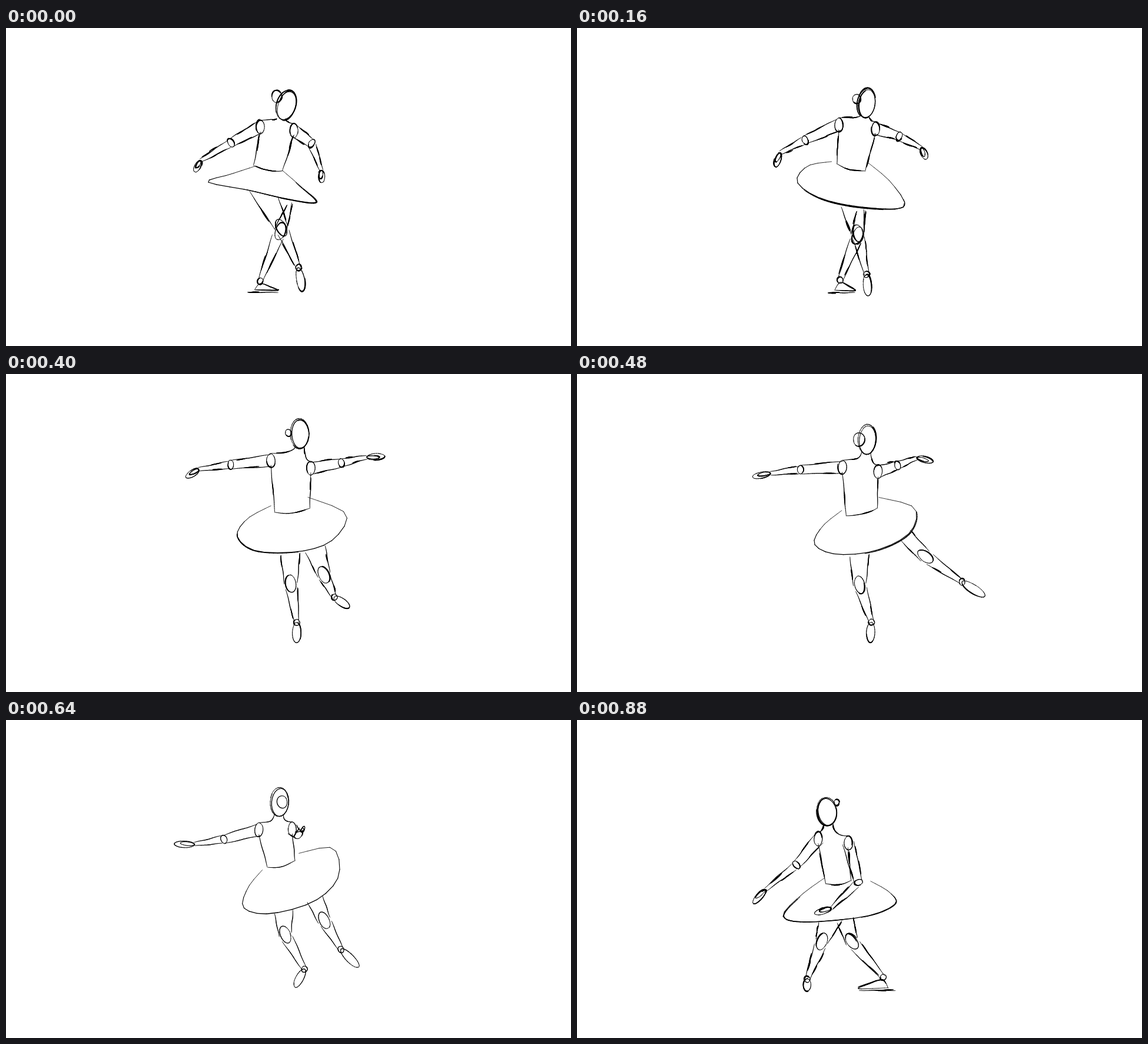
An HTML page with a canvas for the animation above (960 ms loop, 960 by 540 pixels).

```html
<!DOCTYPE html>
<html lang="en">
<head>
<meta charset="utf-8">
<title>Ballet turn</title>
<style>
html, body { margin: 0; width: 100%; height: 100%; overflow: hidden; background: #fff; }
canvas { display: block; width: 960px; height: 540px; }
</style>
</head>
<body>
<canvas id="stage" width="960" height="540"></canvas>
<script>
const ctx = document.getElementById('stage').getContext('2d');
const STEP = 80, STEPS = 12;

// Joints of each key pose, as x, y pairs.
// head: centre, radii, tilt    bun: centre, radius
// arms: shoulder, elbow, wrist, fingertip    waist: left, right
// skirt: outline from left waist round to right waist
// legs: hip left, hip right, knee, ankle, toe
const poses = [
  {
    ink: 3, head: [476,131,16,26,18], bun: [460,116,8.5],
    armL: [432,168, 382,195, 331,225, 321,244], armR: [489,174, 519,196, 536,242, 537,263],
    waist: [421,233, 470,242],
    skirt: [423,235, 382,248, 343,261, 410,275, 480,291, 528,296, 500,268, 470,242],
    legA: [414,278, 463,288, 468,339, 497,407, 504,447],
    legB: [478,300, 486,297, 466,345, 432,430, 462,446]
  },
  {
    ink: 3, head: [486,144,16,25,14], bun: [472,128,8.5],
    armL: [441,175, 385,213, 347,238, 338,263], armR: [488,180, 515,202, 526,240, 526,264],
    waist: [425,236, 479,245],
    skirt: [414,237, 378,260, 362,277, 430,298, 510,308, 545,305, 515,265, 475,241],
    legA: [427,300, 478,309, 468,346, 492,415, 498,452],
    legB: [478,310, 485,310, 467,350, 432,430, 465,446]
  },
  {
    ink: 2, head: [497,111,15,25,0], bun: [478,113,5],
    armL: [449,154, 390,168, 344,186, 337,209], armR: [527,162, 580,166, 645,168, 662,183],
    waist: [458,226, 500,241],
    skirt: [450,217, 405,210, 387,248, 405,284, 470,303, 565,302, 553,262, 516,219],
    legA: [470,307, 497,307, 486,351, 492,422, 492,458],
    legB: [473,313, 496,310, 486,355, 462,426, 480,447]
  },
  {
    ink: 2, head: [499,101,16,25,0], bun: [480,100,5],
    armL: [450,147, 382,154, 327,162, 306,176], armR: [518,160, 570,151, 613,141, 643,140],
    waist: [457,235, 516,228],
    skirt: [450,224, 410,246, 393,275, 425,300, 500,301, 555,282, 578,238, 513,209],
    legA: [467,308, 499,304, 484,356, 494,422, 494,457],
    legB: [509,303, 542,291, 540,341, 558,379, 583,396]
  },
  {
    ink: 1, head: [486,121,15,26,5], bun: [479,123,14],
    armL: [452,170, 378,171, 330,175, 291,174], armR: [505,172, 520,159, 542,144, 568,156],
    waist: [457,246, 504,228],
    skirt: [450,239, 424,270, 413,302, 455,312, 515,299, 575,258, 568,216, 512,209],
    legA: [460,314, 494,308, 477,360, 507,421, 502,455],
    legB: [541,288, 561,272, 580,317, 632,359, 668,382]
  },
  {
    ink: 2, head: [443,157,16,24,0], bun: [459,155,3],
    armL: [407,203, 362,234, 311,247, 281,248], armR: [468,199, 473,232, 462,226, 447,217],
    waist: [432,255, 478,250],
    skirt: [420,270, 398,300, 395,335, 440,345, 530,316, 553,275, 543,220, 484,244],
    legA: [452,343, 482,337, 472,369, 507,425, 481,453],
    legB: [484,331, 515,326, 501,363, 506,420, 530,456]
  },
  {
    ink: 3, head: [424,155,17,24,-8], bun: [441,140,4],
    armL: [410,202, 373,246, 320,288, 299,311], armR: [461,209, 478,276, 432,320, 404,329],
    waist: [422,278, 466,273],
    skirt: [420,268, 380,298, 350,333, 390,343, 490,333, 540,312, 530,292, 499,274],
    legA: [442,345, 469,336, 467,376, 520,437, 479,456],
    legB: [411,343, 450,341, 416,376, 391,440, 391,460]
  }
];

let rnd, ink;

function random(seed) {
  return () => {
    seed = (seed * 1664525 + 1013904223) >>> 0;
    return seed / 4294967296;
  };
}

const mix = (a, b, t) => a.map((v, i) => v + (b[i] - v) * t);
const pairs = list => list.filter((_, i) => i % 2 === 0).map((x, i) => [x, list[2 * i + 1]]);

// Point beside joint a, across the bone from a to b; positive is left when facing down.
function beside([x, y], a, b, width) {
  const dx = b[0] - a[0], dy = b[1] - a[1], k = width / (Math.hypot(dx, dy) || 1);
  return [x - dy * k, y + dx * k];
}

// One tapered dash over part of a curve, u in 0..1, slightly off its true place.
function dash(curve, from, to, weight, sway) {
  const phase = rnd() * 6.28, dx = (rnd() - 0.5) * sway, dy = (rnd() - 0.5) * sway;
  const spot = u => {
    const [x, y] = curve(u);
    return [x + dx + 0.4 * Math.sin(phase + u * 9), y + dy + 0.4 * Math.cos(phase + u * 8)];
  };
  const n = 24;
  for (let i = 0; i < n; i++) {
    ctx.lineWidth = weight * (0.55 + 0.5 * Math.sin(Math.PI * (i + 0.5) / n));
    ctx.beginPath();
    ctx.moveTo(...spot(from + (to - from) * i / n));
    ctx.lineTo(...spot(from + (to - from) * (i + 1) / n));
    ctx.stroke();
  }
}

function sketch(curve) {
  dash(curve, 0, 1, 1.25, 0.5);
  for (let i = 1; i < ink; i++) {
    const start = rnd() * 0.6;
    dash(curve, start, start + 0.25 + rnd() * 0.15, 1.6, 2);
  }
}

const line = (a, b) => sketch(u => mix(a, b, u));

function bend(a, c, b) {
  sketch(u => mix(mix(a, c, u), mix(c, b, u), u));
}

function spline(points) {
  const last = points.length - 1;
  const at = i => points[Math.max(0, Math.min(last, i))];
  sketch(u => {
    const i = Math.min(Math.floor(u * last), last - 1), t = u * last - i;
    const [a, b, c, d] = [-1, 0, 1, 2].map(k => at(i + k));
    return [0, 1].map(n => b[n] + 0.5 * t * (c[n] - a[n] + t * (2 * a[n] - 5 * b[n]
      + 4 * c[n] - d[n] + t * (3 * (b[n] - c[n]) + d[n] - a[n]))));
  });
}

function ellipse([cx, cy], rx, ry, angle = 0) {
  const cos = Math.cos(angle), sin = Math.sin(angle), start = rnd() * 6.28;
  sketch(u => {
    const a = start + u * 6.6;
    const x = rx * Math.cos(a), y = ry * Math.sin(a);
    return [cx + x * cos - y * sin, cy + x * sin + y * cos];
  });
}

const angleOf = (a, b) => Math.atan2(b[1] - a[1], b[0] - a[0]);

function oval(a, b, width) {
  ellipse(mix(a, b, 0.5), Math.hypot(b[0] - a[0], b[1] - a[1]) / 2, width, angleOf(a, b));
}

function bone(a, b, widthA, widthB) {
  for (const side of [1, -1]) {
    line(beside(a, a, b, side * widthA), beside(b, a, b, side * widthB));
  }
}

function drawArm(joints) {
  const [shoulder, elbow, wrist, tip] = pairs(joints);
  ellipse(shoulder, 7, 12);
  bone(shoulder, elbow, 10, 7);
  ellipse(elbow, 5, 7.5, angleOf(shoulder, elbow));
  bone(mix(elbow, wrist, 0.08), wrist, 6.5, 3);
  oval(wrist, tip, 5.5);
  oval(wrist, beside(mix(wrist, tip, 0.7), wrist, tip, 2), 3);
}

function drawFoot(ankle, toe) {
  const dx = toe[0] - ankle[0], dy = toe[1] - ankle[1];
  const standing = toe[1] > 440;
  if (!standing || Math.abs(dx) < Math.abs(dy)) return oval(ankle, toe, 7);
  const way = Math.sign(dx), heel = [ankle[0] - way * 9, toe[1] - 1];
  spline([heel, toe, mix(ankle, toe, 0.55), [ankle[0], ankle[1] + 4], heel]);
  line([heel[0] - way * 12, toe[1] + 3], [toe[0], toe[1] + 3]);
}

function drawLeg(joints) {
  const [hipL, hipR, knee, ankle, toe] = pairs(joints);
  const hip = mix(hipL, hipR, 0.5);
  line(hipL, beside(knee, hip, ankle, 11));
  line(hipR, beside(knee, hip, ankle, -11));
  ellipse(knee, 15, 8.5, angleOf(hip, ankle));
  bone(mix(knee, ankle, 0.12), ankle, 10, 4);
  ellipse(ankle, 5, 5.5);
  drawFoot(ankle, toe);
}

function drawBody({ head, bun, armL, armR, waist, skirt }) {
  const [x, y, rx, ry, tilt] = head, lean = tilt * Math.PI / 180;
  const [left, right] = pairs(waist);
  ellipse([x, y], rx, ry, lean);
  ellipse([x + 1, y + 1], rx - 1.5, ry - 1, lean);
  ellipse(bun, bun[2], bun[2] * 1.25);

  const chin = [x - ry * Math.sin(lean), y + ry - 3];
  [[armL, left, -1], [armR, right, 1]].forEach(([[sx, sy], hip, side]) => {
    const neck = [chin[0] + side * 8, chin[1]];
    bend(neck, [neck[0], sy - 12], [sx, sy - 12]);
    line([sx, sy + 8], hip);
  });
  bend(left, [(left[0] + right[0]) / 2, (left[1] + right[1]) / 2 + 8], right);
  spline(pairs(skirt));
}

// Even steps hold a key pose for the later part of the turn; the steps between blend two.
function poseAt(step) {
  const place = step ? (step + 1) / 2 : 0, from = Math.floor(place), t = place - from;
  const a = poses[from], b = poses[Math.ceil(place)], pose = { ink: a.ink };
  for (const part of Object.keys(a).slice(1)) pose[part] = mix(a[part], b[part], t);
  // The free leg whips past its final stretch before settling.
  if (from === 3 && t) pose.legB = mix(a.legB, b.legB, 1.3);
  return pose;
}

function draw(step) {
  const pose = poseAt(step);
  rnd = random(step * 97 + 11);
  ink = pose.ink;
  ctx.fillStyle = '#fff';
  ctx.fillRect(0, 0, 960, 540);
  ctx.strokeStyle = '#000';
  ctx.lineCap = 'round';
  drawBody(pose);
  drawArm(pose.armL);
  drawArm(pose.armR);
  drawLeg(pose.legB);
  drawLeg(pose.legA);
}

let shown = -1;
function tick() {
  const step = Math.floor(performance.now() / STEP) % STEPS;
  if (step !== shown) draw(shown = step);
  requestAnimationFrame(tick);
}
tick();
</script>
</body>
</html>
```
